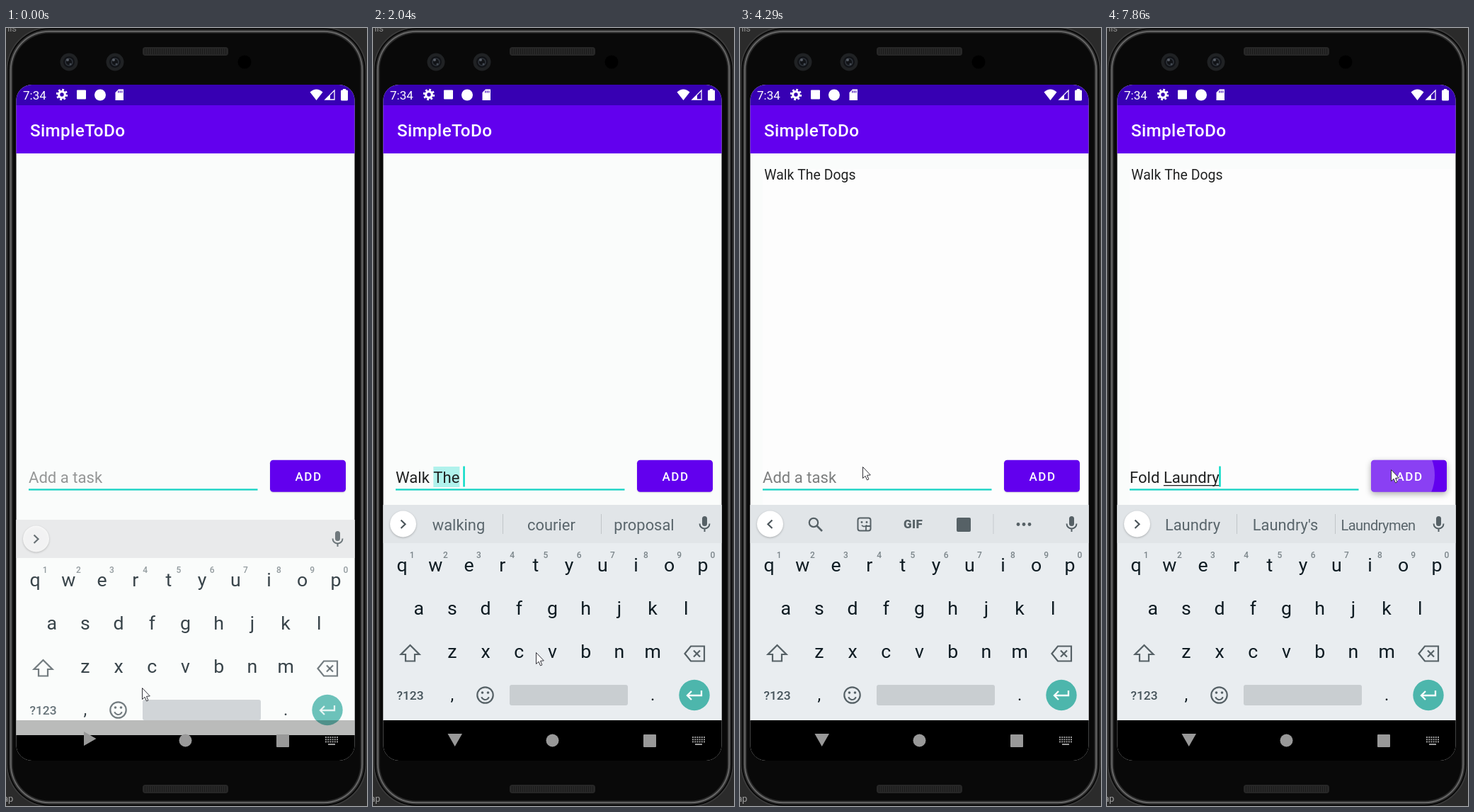
These frames come from a looping animation (510x1098 px, 8 s). An HTML page with a canvas:

```html
<!DOCTYPE html>
<html lang="en">
<head>
<meta charset="utf-8">
<title>To-do list</title>
<style>
html, body { margin: 0; width: 510px; height: 1098px; overflow: hidden; background: #2b2b2b; }
canvas { display: block; }
</style>
</head>
<body>
<canvas id="stage" width="510" height="1098"></canvas>
<script>
const ctx = document.getElementById('stage').getContext('2d');
const LOOP = 8000, FRAME = 145, BLINK = 500;
const FONT = 'Roboto, "Noto Sans", sans-serif';
const PURPLE = '#6200ee', TEAL = '#03dac5', ICON = '#566166', PAGE = '#fafcfb', INK = '#212222';
const MID = 253.5, KEY = 47.2;
const PRESSES = [3590, 7860];
const ADDED = 3740;

// Each word is typed a letter per step from `at`; at `end` it is committed, or added when nothing follows
const WORDS = [
  { at: 720, step: 137, end: 1590, before: '', word: 'Walk', other: 'Was',
    full: ['Walk', 'Walking', 'Walks'], next: ['the', 'to', 'in'] },
  { at: 1750, step: 145, end: 2040, before: 'Walk ', word: 'The', other: 'This', corrected: true,
    full: ['The', 'Then', 'They'], next: ['walking', 'courier', 'proposal'] },
  { at: 2160, step: 235, end: ADDED, before: 'Walk The ', word: 'Dogs', other: 'Door',
    full: ['Dogs', "Dog's", 'Doors'] },
  { at: 4890, step: 200, end: 5790, before: '', word: 'Fold', other: 'For',
    full: ['Fold', 'Folder', 'Folds'], next: ['it', 'the', 'laundry'] },
  { at: 6070, step: 125, end: LOOP, before: 'Fold ', word: 'Laundry', other: 'Last',
    full: ['Laundry', "Laundry's", 'Laundrymen'] }
];

// Pointer moves: start, end, x, y
const MOVES = [
  [150, 440, 230, 881], [2870, 3450, 435, 622], [3600, 3890, 176, 650], [3890, 4200, 173, 619],
  [4200, 4590, 181, 611], [6990, 7140, 140, 604], [7140, 7720, 401, 623]
];

function pointerAt(t) {
  const now = Math.floor(t / FRAME) * FRAME;
  let x = 192, y = 931;
  for (const [from, to, nx, ny] of MOVES) {
    const k = Math.min(1, Math.max(0, (now - from) / (to - from)));
    const ease = k * k * (3 - 2 * k);
    x += (nx - x) * ease;
    y += (ny - y) * ease;
  }
  return [x, y];
}

function typingAt(t) {
  const w = WORDS.filter(v => v.at <= t).pop();
  if (!w) return { done: '', typed: '', key: -BLINK };
  if (t >= w.end) {
    return w.next
      ? { done: w.before + w.word + ' ', typed: '', chips: w.next, key: w.end, mark: w.corrected && w }
      : { done: '', typed: '', key: w.end };
  }
  const n = Math.min(w.word.length, 1 + Math.floor((t - w.at) / w.step));
  const typed = w.word.slice(0, n);
  const whole = typed === w.word;
  return { done: w.before, typed, key: w.at + (n - 1) * w.step, guess: !whole,
    chips: whole ? w.full : [typed, w.word, w.other] };
}

function rect(x, y, w, h, color) {
  ctx.fillStyle = color;
  ctx.fillRect(x, y, w, h);
}
function roundPath(x, y, w, h, r) {
  ctx.beginPath();
  ctx.roundRect(x, y, w, h, r);
}
function round(x, y, w, h, r, color) {
  roundPath(x, y, w, h, r);
  ctx.fillStyle = color;
  ctx.fill();
}
function disc(x, y, r, color) {
  ctx.beginPath();
  ctx.arc(x, y, r, 0, 7);
  ctx.fillStyle = color;
  ctx.fill();
}
function stroke(color, w) {
  ctx.strokeStyle = color;
  ctx.lineWidth = w;
  ctx.stroke();
}
function ring(x, y, r, color, w, a = 0, b = Math.PI * 2) {
  ctx.beginPath();
  ctx.arc(x, y, r, a, b);
  stroke(color, w);
}
function poly(points, color, w, closed = true) {
  ctx.beginPath();
  points.forEach(p => ctx.lineTo(p[0], p[1]));
  if (closed) ctx.closePath();
  if (w) return stroke(color, w);
  ctx.fillStyle = color;
  ctx.fill();
}
function text(s, x, y, size, color, weight = 400, align = 'left', spacing = 0) {
  ctx.font = `${weight} ${size}px ${FONT}`;
  ctx.textAlign = align;
  ctx.letterSpacing = spacing + 'px';
  ctx.fillStyle = color;
  ctx.fillText(s, x, y);
  const width = ctx.measureText(s).width;
  ctx.letterSpacing = '0px';
  return width;
}
function shadow(color, blur, drop) {
  ctx.shadowColor = color;
  ctx.shadowBlur = blur;
  ctx.shadowOffsetY = drop;
}

function drawGrille(y) {
  round(193, y, 121, 12, 4, '#272727');
  for (let x = 196; x < 312; x += 3) rect(x, y + 2, 1, 8, '#1b1b1b');
}

function drawPhone() {
  rect(0, 0, 510, 1098, '#2b2b2b');
  text('nis', -2, 5, 13, '#8c8c8c');
  text('ap', -4, 1092, 13, '#a0a0a0');
  // The rim is a stack of bands, from the edge inwards
  ['#3a3a3a', '#060606', '#303030', '#6a6a6a', '#2a2a2a', '#090909'].forEach((color, i) => {
    const d = 0.5 + i * 1.8;
    round(d, d - 2, 510 - 2 * d, 1102 - 2 * d, 61 - d, color);
  });
  drawGrille(27);
  drawGrille(1068);
  for (const x of [89, 154]) {
    disc(x, 48, 12.5, '#202224');
    disc(x, 48, 8, '#111317');
    ring(x, 48, 5, '#30353c', 1.5);
    disc(x - 2, 45, 2, '#555b64');
    disc(x + 2, 51, 1.5, '#454b54');
  }
  disc(337, 48, 9.5, '#000');
}

function drawStatus() {
  text('7:34', 24, 101, 17, '#fff');
  ctx.setLineDash([2.7, 2.53]);
  ring(79, 94, 6.66, '#fff', 3);
  ctx.setLineDash([]);
  ring(79, 94, 4.3, '#fff', 3.2);
  round(100, 87.5, 13, 13, 1, '#fff');
  disc(133, 94.5, 8, '#fff');
  poly([[159, 86.5], [166, 86.5], [166, 102], [154.5, 102], [154.5, 91]], '#fff');
  for (let i = 0; i < 3; i++) rect(158.2 + 2.5 * i, 88.5, 1.2, 3, '#3700b3');
  ctx.beginPath();
  ctx.moveTo(438.5, 102);
  ctx.lineTo(429.5, 90.5);
  ctx.quadraticCurveTo(438.5, 82.5, 447.5, 90.5);
  ctx.fillStyle = '#fff';
  ctx.fill();
  poly([[464, 88], [464, 101], [451, 101]], '#fff', 1.3);
  poly([[458, 94], [458, 101], [451, 101]], '#fff');
  round(473, 87.5, 10, 15, 1.5, '#fff');
  rect(476, 86, 4, 2, '#fff');
}

function drawField(t, { done, typed, key, mark }) {
  const left = 32, base = 642, size = 22.1;
  ctx.font = `400 ${size}px ${FONT}`;
  const measure = s => ctx.measureText(s).width;
  if (mark) rect(left + measure(mark.before), 619, measure(mark.word), 29, '#b0f2ec');
  if (!done && !typed) text('Add a task', left, base, size, t < FRAME ? '#949696' : '#7c7e7e');
  const start = left + text(done, left, base, size, INK);
  const end = start + text(typed, start, base, size, INK);
  rect(start, 645, end - start, 1.3, INK);
  const event = Math.max(key, ...PRESSES.filter(p => p <= t));
  if (Math.floor((t - event) / BLINK) % 2 === 0) rect(end - 0.5, 618.5, 2.4, 29, TEAL);
  rect(left, 650.3, 323.5, 2.3, '#16d3c4');
}

function drawButton(t) {
  const press = PRESSES.find(p => t >= p && t < p + 300);
  const path = [373, 609.7, 107, 45, 4.5];
  ctx.save();
  shadow(press ? 'rgba(0,0,0,.32)' : 'rgba(0,0,0,.14)', press ? 8 : 2, press ? 3 : 1);
  round(...path, PURPLE);
  ctx.restore();
  if (press) {
    const stage = Math.floor((t - press) / 150);
    const [x, y] = pointerAt(press);
    ctx.save();
    roundPath(...path);
    ctx.clip();
    disc(x, y + 8, 62 + 70 * stage, `rgba(255,255,255,${0.25 - 0.13 * stage})`);
    ctx.restore();
  }
  text('ADD', 408.5, 638.5, 17, '#fff', 500, 'left', 1.5);
}

function drawMic() {
  round(465, 689, 7, 14, 3.5, ICON);
  ring(468.5, 699.5, 7, ICON, 2, 0, Math.PI);
  rect(467.5, 706, 2, 5, ICON);
}

function drawToolbar() {
  ring(104, 698, 6.2, ICON, 2.2);
  poly([[108.5, 702.5], [116, 710]], ICON, 2.6, false);
  roundPath(166.5, 691.5, 18, 18, 3);
  stroke(ICON, 2);
  poly([[178, 710], [178, 703], [185, 703]], ICON, 1.8, false);
  disc(172, 697.5, 1.4, ICON);
  disc(179, 697.5, 1.4, ICON);
  ring(175.5, 699.5, 4, ICON, 1.6, 0.5, 2.6);
  text('GIF', 244.5, 706, 17, ICON, 900, 'center', 0.4);
  round(306, 691, 20, 20, 2, ICON);
  rect(357.5, 686, 1, 28, '#c5cacd');
  for (let i = -1; i < 2; i++) disc(401 + 8 * i, 700.5, 2.4, ICON);
}

function drawChips(chips, guess) {
  chips.forEach((word, i) => {
    const bold = guess && i === 1 && chips[0].length > 1;
    const long = word.length > 9;
    if (i) rect(44 + 139 * i, 686, 1, 28, '#c0c5c8');
    text(word, 121 + 131 * i, 709, long ? 20 : 21.9, bold ? '#000' : '#5a666c',
      bold ? 700 : 400, 'center', long ? -0.55 : 0);
  });
}

function drawKeys() {
  const ink = '#0e1b22';
  ['qwertyuiop', 'asdfghjkl', 'zxcvbnm'].forEach((row, r) => {
    [...row].forEach((c, i) => {
      const x = MID + KEY * (i - (row.length - 1) / 2);
      text(c, x, 766.8 + 61.2 * r, 26.7, ink, 400, 'center');
      if (r === 0) text((i + 1) % 10, x + 14, 748, 12, '#7b858a', 500, 'center');
    });
  });
  poly([[52.5, 871], [65.5, 884], [59, 884], [59, 893.5], [46, 893.5], [46, 884], [39.5, 884]], ICON, 2.2);
  poly([[440.5, 883], [449, 872.5], [468, 872.5], [468, 893.5], [449, 893.5]], ICON, 2.2);
  for (const d of [4.5, -4.5]) poly([[457.5 - d, 878.5], [457.5 + d, 887.5]], ICON, 2.2, false);
  text('?123', 52.5, 948, 17.4, '#46545b', 500, 'center');
  text(',', MID - 3 * KEY, 949, 24, ink, 400, 'center');
  text('.', MID + 3 * KEY, 949, 24, ink, 400, 'center');
  ring(158.5, 941.5, 11.2, ICON, 2.2);
  disc(154.5, 938, 1.8, ICON);
  disc(162.5, 938, 1.8, ICON);
  ring(158.5, 942.5, 5.5, ICON, 2, 0.3, 2.84);
  round(193, 927, 167, 29, 3, '#c9ced1');
  disc(454, 941.5, 21.7, '#4db6ac');
  poly([[464, 935], [464, 942], [445, 942]], '#fff', 2.3, false);
  poly([[450, 936], [444, 942], [450, 948]], '#fff', 2.3, false);
}

function drawKeyboard(t, { chips, guess }) {
  const rising = t < 150;
  const tools = !chips && t >= 300;
  ctx.save();
  ctx.translate(0, rising ? 21 : 0);
  rect(14, 673, 479, 304, rising ? PAGE : '#e9edf0');
  rect(14, 673, 479, 54, rising ? '#e9eaeb' : '#e1e5e8');
  ctx.globalAlpha = rising ? 0.82 : 1;
  ctx.save();
  shadow('rgba(0,0,0,.25)', 3, 1);
  disc(42.5, 700, 18.5, '#fff');
  ctx.restore();
  const d = tools ? -3 : 3;
  poly([[42.5 - d, 694.5], [42.5 + d, 700.3], [42.5 - d, 706]], '#4c565b', 2.2, false);
  if (tools) drawToolbar();
  if (chips) drawChips(chips, guess);
  drawMic();
  drawKeys();
  ctx.restore();
}

function drawNav(t) {
  const gray = '#999';
  const rising = t < 150;
  const top = rising ? 998 : 977;
  if (rising) rect(14, 977, 479, 21, 'rgba(0,0,0,.26)');
  rect(14, top, 479, 1034 - top, '#000');
  poly(rising ? [[110, 993], [127.5, 1003], [110, 1013]] : [[105.5, 996], [126, 996], [115.7, 1014]], gray);
  disc(MID, 1005.5, 9, gray);
  round(382, 997, 18, 18, 1, gray);
  for (let i = 0; i < 18; i++) rect(451 + (i % 6) * 3.2, 1000 + Math.floor(i / 6) * 3.2, 2, 2, gray);
  rect(455, 1010, 10, 2, gray);
}

function drawPointer([x, y]) {
  const shape = [[0, 0], [0, 16], [3.6, 12.8], [6, 18.4], [8.4, 17.4], [6, 11.8], [10.8, 11.4]];
  const points = shape.map(p => [x + p[0] + 0.5, y + p[1] + 0.5]);
  poly(points, '#fff');
  poly(points, '#33333a', 1);
}

function draw(t) {
  const typing = typingAt(t);
  drawPhone();
  ctx.save();
  roundPath(14.5, 80, 478, 954, 22);
  ctx.clip();
  rect(14, 80, 479, 954, PAGE);
  rect(14, 80, 479, 29, '#3700b3');
  rect(14, 109, 479, 68, PURPLE);
  drawStatus();
  text('SimpleToDo', 34, 152.5, 24.3, '#fff', 500, 'left', 0.35);
  if (t >= ADDED) {
    rect(32, 199, 458, 474, '#fdfdfd');
    text('Walk The Dogs', 34.3, 214, 19.44, INK);
  }
  drawField(t, typing);
  drawButton(t);
  drawKeyboard(t, typing);
  drawNav(t);
  ctx.restore();
  drawPointer(pointerAt(t));
}

const start = performance.now();
function loop() {
  draw((performance.now() - start) % LOOP);
  requestAnimationFrame(loop);
}
loop();
</script>
</body>
</html>
```
